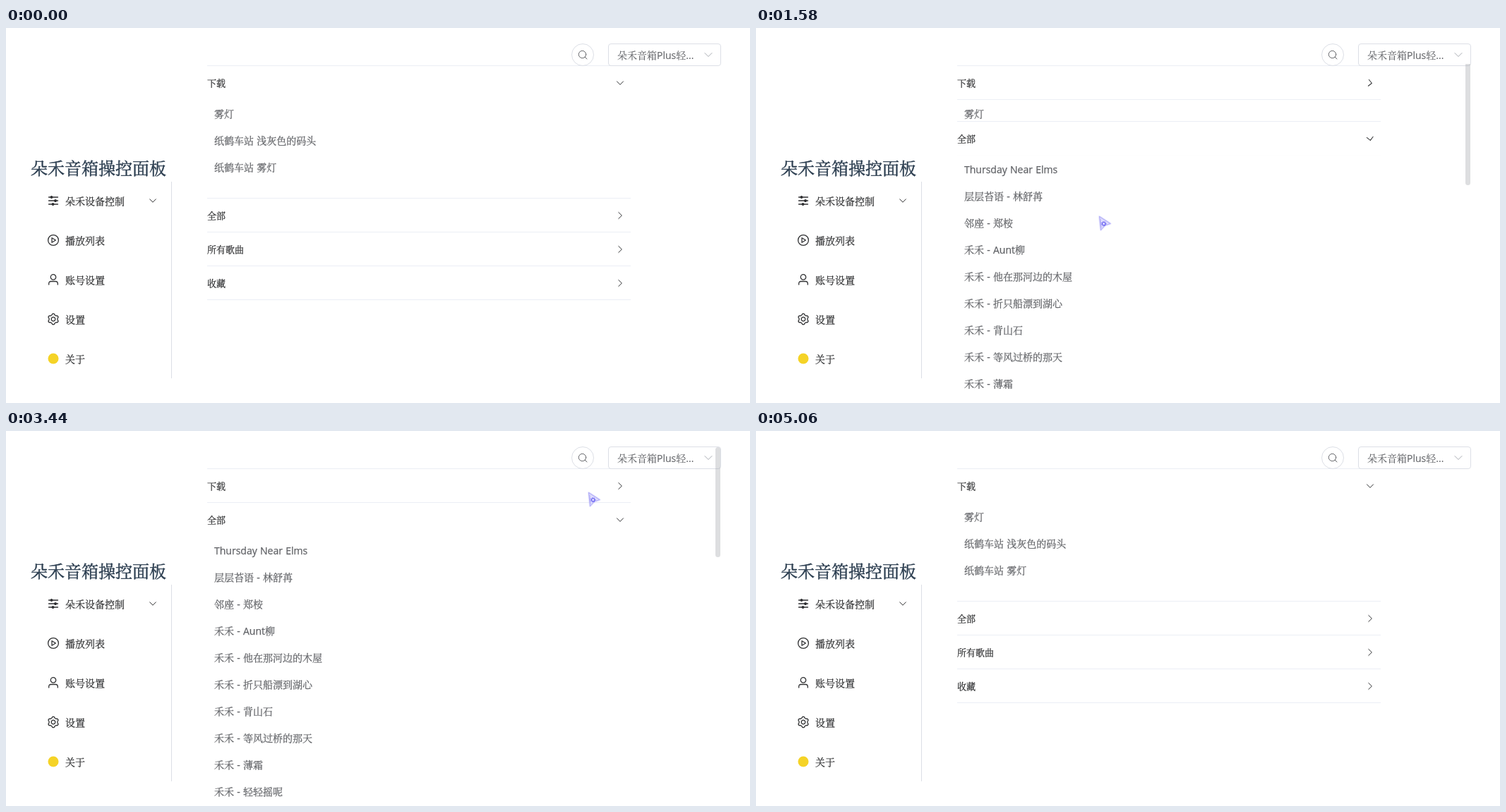
An HTML page that plays this animation: 1054 px wide and 532 px high, repeating every 5110 ms.

```html
<!DOCTYPE html>
<html lang="zh-CN">
<head>
<meta charset="utf-8">
<style>
html, body { margin: 0; width: 100%; height: 100%; overflow: hidden; background: #fff; }
body { position: relative; color: #303133; font: 14px "Open Sans", "Noto Serif CJK SC", "Noto Sans CJK SC", "Noto Sans CJK", sans-serif; word-spacing: .6px; -webkit-text-stroke: .25px; }
svg { position: absolute; overflow: visible; fill: none; stroke: #303133; stroke-linecap: round; stroke-linejoin: round; }
h1 { position: absolute; left: 35px; top: 180px; margin: 0; font-size: 24px; font-weight: 400; line-height: 38px; color: #2c3e50; white-space: nowrap; -webkit-text-stroke: .45px; }
#menu { position: absolute; left: 0; top: 218px; width: 234px; height: 279px; border-right: 1px solid #dcdfe6; }
#menu div { position: relative; height: 56px; padding-left: 84px; line-height: 56px; }
#menu svg { left: 67px; top: 27px; width: 1px; height: 1px; stroke-width: 1.3; }
#menu svg.more { left: 208px; stroke-width: 1; }
#search { position: absolute; z-index: 1; left: 801px; top: 22px; width: 30px; height: 30px; border: 1px solid #dcdfe6; border-radius: 50%; }
#search svg { left: 15px; top: 15px; width: 1px; height: 1px; stroke: #606266; }
#device { position: absolute; z-index: 1; left: 853px; top: 22px; width: 146px; height: 30px; padding-left: 12px; border: 1px solid #dcdfe6; border-radius: 4px; line-height: 32px; color: #606266; -webkit-text-stroke: .1px; }
#device svg { left: 141px; top: 15px; width: 1px; height: 1px; stroke: #a8abb2; }
#lists { position: absolute; left: 285px; top: 53px; width: 600px; border-top: 1px solid #ebeef5; }
.head { position: relative; box-sizing: border-box; height: 48px; border-bottom: 1px solid; line-height: 48px; font-size: 13px; font-weight: 500; }
.head svg { left: 585px; top: 24px; width: 1px; height: 1px; }
.wrap { overflow: hidden; border-bottom: 1px solid #ebeef5; }
.row { position: relative; height: 38px; padding-left: 10px; line-height: 39px; color: #606266; white-space: pre; }
.row svg { display: none; width: 1px; height: 1px; top: 19px; }
.row.on { background: #ececec; }
.row.on svg { display: block; }
#thumb { position: absolute; z-index: 2; left: 1005px; top: 23px; width: 7px; border-radius: 4px; background: rgba(144, 147, 153, .3); }
#cursor { z-index: 3; left: 0; top: 0; width: 1px; height: 1px; }
</style>
</head>
<body>
<h1>朵禾音箱操控面板</h1>
<div id="menu"></div>
<div id="search"><svg><circle cx="-.5" cy="-.5" r="5.2"/><path d="M3.3 3.3 6 6"/></svg></div>
<div id="device">朵禾音箱Plus轻...<svg><path d="M-5-2.5 0 2.5 5-2.5"/></svg></div>
<div id="lists"></div>
<div id="thumb"></div>
<svg id="cursor">
  <path d="M1.5 1.5 17 11.5 9.5 14 3.5 20.5Z" stroke="#c9c6ff" stroke-width="3" opacity=".4"/>
  <path d="M1.5 1.5 17 11.5 9.5 14 3.5 20.5Z" fill="#e0defd" stroke="#b3aff6" stroke-width="1.1"/>
  <path d="M3 5 4 17" stroke="#8d88f0" stroke-width=".9" opacity=".6"/>
  <circle cx="7.7" cy="11.7" r="2.2" stroke="#6a63f2" stroke-width="1.2"/>
  <circle cx="7.7" cy="11.7" r="3.3" stroke="#6a63f2" stroke-width=".9" stroke-dasharray="1.2 1.5" stroke-linecap="butt"/>
</svg>
<script>
const LOOP = 5110, OPEN = 300;
const $ = id => document.getElementById(id);

const add = (parent, cls, html) => {
  const el = document.createElement('div');
  el.className = cls;
  el.innerHTML = html;
  parent.append(el);
  return el;
};

// Gear outline with six teeth, one pointing up
const gear = () => {
  let d = '';
  for (let i = 0; i < 24; i++) {
    const a = (i + .5) * Math.PI / 12, r = i % 4 === 1 || i % 4 === 2 ? 7.6 : 6;
    d += (i ? 'L' : 'M') + (r * Math.cos(a)).toFixed(2) + ' ' + (r * Math.sin(a)).toFixed(2);
  }
  return d + 'Z';
};

const icon = (body, attr = '') => `<svg ${attr}>${body}</svg>`;
const dot = (x, y) => `<circle cx="${x}" cy="${y}" r="1.3" fill="#303133"/>`;
const menu = [
  ['朵禾设备控制', '<path d="M-6.5-5H6.5M-6.5 0H6.5M-6.5 5H6.5"/>' + dot(-2.5, -5) + dot(3, 0) + dot(-.5, 5)],
  ['播放列表', '<circle r="7.4"/><path d="M-2-3.3V3.3L3.4 0Z"/>'],
  ['账号设置', '<circle cy="-3.6" r="3.7"/><path d="M-6.3 7V5.5Q-6.3 2.5-3.3 2.5H3.3Q6.3 2.5 6.3 5.5V7"/>'],
  ['设置', `<path d="${gear()}"/><circle r="2.8"/>`],
  ['关于', '<circle r="7.5" fill="#f5d327" stroke="none"/>']
];
menu.forEach(([name, body], i) => add($('menu'), '', name + icon(body) +
  (i ? '' : icon('<path d="M-4.3-2.2 0 2.2 4.3-2.2"/>', 'class="more"'))));

const tools =
  icon('<path d="M-6.5-7.5V7.5L7 0Z" stroke-width="1.2"/>', 'style="left:484px"') +
  icon('<path d="M-8-5H8M-3-5V-8H3V-5M-6-5V8H6V-5" stroke-width="1.3"/><path d="M-2-1V4M2-1V4" stroke="#b0605f" stroke-width="1.3"/>', 'style="left:521px"');

const songs = {
  '下载': ['雾灯', '纸鹤车站 浅灰色的码头', '纸鹤车站 雾灯'],
  '全部': ['Thursday Near Elms', '层层苔语 - 林舒苒', '邻座 - 郑桉', ...[
    'Aunt柳', '他在那河边的木屋', '折只船漂到湖心', '背山石',
    '等风过桥的那天', '薄霜', '轻轻摇呢', '旧雨棚'].map(s => '禾禾 - ' + s)],
  '所有歌曲': [],
  '收藏': []
};
const sections = Object.entries(songs).map(([name, list]) => {
  const head = add($('lists'), 'head', name + icon('<path d="M-2.2-4.5 2.4 0-2.2 4.5"/>'));
  const wrap = add($('lists'), 'wrap', '');
  const rows = list.map(s => add(wrap, 'row', s + tools));
  return { head, wrap, rows, arrow: head.querySelector('svg') };
});
const FULL = [139, 1431, 0, 0];

// time, x, y of the pointer
const path = [
  [100, 529, 487], [300, 508, 350], [510, 485, 270], [650, 485, 270], [700, 486, 269],
  [880, 486, 269], [890, 485, 266], [1870, 485, 266], [1970, 489, 258], [2350, 572, 149],
  [2380, 582, 144], [2430, 582, 144], [2960, 843, 56], [3050, 842, 56], [3190, 842, 56],
  [3440, 824, 86], [3890, 824, 86], [3900, 823, 86], [4060, 823, 86], [4260, 681, 481],
  [4310, 655, 504], [4390, 625, 523]
];

const pointer = t => {
  let i = 1;
  while (i < path.length - 1 && path[i][0] < t) i++;
  const [t0, x0, y0] = path[i - 1], [t1, x1, y1] = path[i];
  const u = Math.min(1, Math.max(0, (t - t0) / (t1 - t0)));
  return [x0 + (x1 - x0) * u, y0 + (y1 - y0) * u];
};

const bezier = (x1, y1, x2, y2) => u => {
  if (u <= 0) return 0;
  if (u >= 1) return 1;
  const at = (a, b, s) => 3 * a * s * (1 - s) ** 2 + 3 * b * s * s * (1 - s) + s ** 3;
  let lo = 0, hi = 1;
  for (let i = 0; i < 22; i++) {
    const mid = (lo + hi) / 2;
    if (at(x1, x2, mid) < u) lo = mid; else hi = mid;
  }
  return at(y1, y2, lo);
};
const inOut = bezier(.42, 0, .58, 1), ease = bezier(.25, .1, .25, 1);

// Openness of each section
const openness = (t, curve) => {
  const step = start => curve((t - start) / OPEN);
  return [1 - step(1377) + step(3761), step(1390) - step(3750), 0, 0];
};

const render = t => {
  const size = openness(t, inOut), turn = openness(t, ease);
  let content = 223;
  sections.forEach((s, i) => {
    const h = FULL[i] * size[i];
    content += h;
    s.wrap.style.display = size[i] > 0 ? '' : 'none';
    s.wrap.style.height = h + 'px';
    s.head.style.borderColor = `rgba(235, 238, 245, ${1 - turn[i]})`;
    s.arrow.style.transform = `rotate(${90 * turn[i]}deg)`;
    s.arrow.style.transformOrigin = '0 0';
  });

  const view = 508, thumb = $('thumb').style;
  thumb.display = content > view ? '' : 'none';
  thumb.height = view * view / content + 'px';
  thumb.clipPath = t < 1880 ? 'inset(28px 0 0 0)' : 'none';

  const hovering = t >= 1880 && t < 2440;
  const over = hovering ? Math.max(0, Math.floor((pointer(t - 80)[1] - 150) / 38)) : -1;
  sections[1].rows.forEach((r, i) => r.classList.toggle('on', i === over));

  const [x, y] = pointer(t), cursor = $('cursor').style;
  cursor.display = t >= 100 && t < 4390 ? '' : 'none';
  cursor.transform = `translate(${x}px, ${y}px)`;
};

const start = performance.now();
const tick = () => {
  render((performance.now() - start) % LOOP);
  requestAnimationFrame(tick);
};
render(0);
requestAnimationFrame(tick);
</script>
</body>
</html>
```
